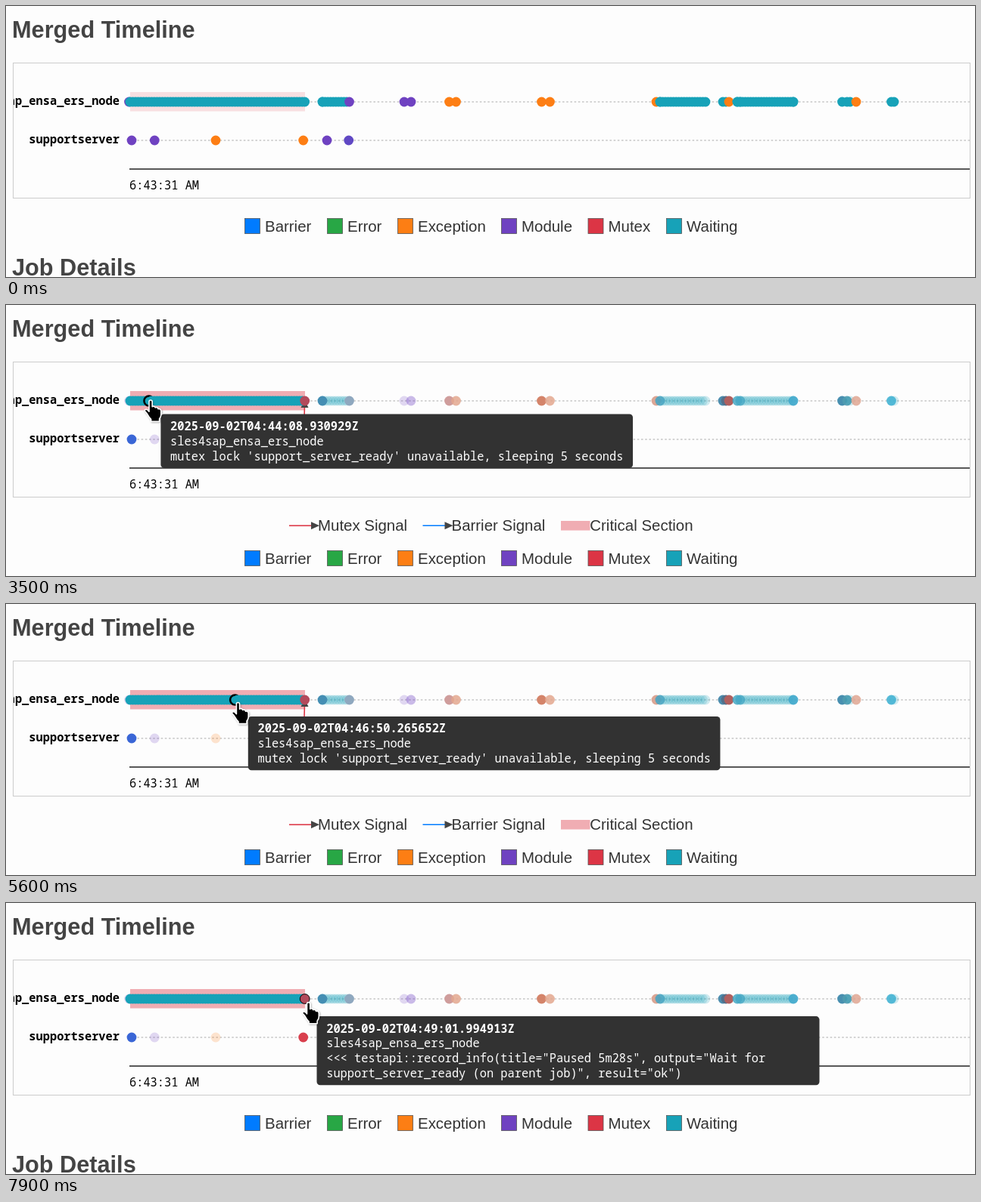
Recreate the animation shown at these times as an HTML page. Size 1280 px wide and 359 px high, loop 8000 ms.

```html
<!DOCTYPE html>
<html lang="en">
<head>
<meta charset="utf-8">
<title>Merged Timeline</title>
<style>
  html, body { margin: 0; width: 100%; height: 100%; overflow: hidden; background: #fdfdfd; }
  svg { display: block; width: 100%; height: 100%; }
  .head { font: bold 30.7px "Liberation Sans", Arial, sans-serif; fill: #444; }
  .key { font: 20.46px "Liberation Sans", Arial, sans-serif; fill: #333; }
  .mono { font: 15.35px "Noto Sans Mono", "DejaVu Sans Mono", monospace; }
  .bold { font-weight: bold; }
  .cursor { filter: drop-shadow(1px 1.5px 1px rgba(0, 0, 0, .3)); }
</style>
</head>
<body>
<svg id="stage" viewBox="0 0 1280 359"></svg>
<script>
const LOOP = 8000, STEP = 100;
const TEAL = '#17a2b8', PURPLE = '#6f42c1', ORANGE = '#fd7e14', RED = '#dc3545', BLUE = '#007bff';
const ROWS = [127, 178], R = 6.4, GAP = 3.553, LOCK_X = 188.8, FIRST = -7, LAST = 57, CHAR = 9.21;

const stage = document.getElementById('stage');

function add(parent, tag, attrs = {}, text) {
  const el = document.createElementNS('http://www.w3.org/2000/svg', tag);
  set(el, attrs);
  if (text !== undefined) el.textContent = text;
  parent.append(el);
  return el;
}
function set(el, attrs) {
  for (const name in attrs) el.setAttribute(name, attrs[name]);
}
const show = (el, on) => el.setAttribute('display', on ? 'inline' : 'none');
const mix = (a, b, p) => a + (b - a) * p;

// Page and chart frame
add(stage, 'text', { x: 8, y: 42, class: 'head' }, 'Merged Timeline');
const details = add(stage, 'text', { x: 8, y: 357, class: 'head' }, 'Job Details');
add(stage, 'rect', { x: 9.5, y: 75.5, width: 1264, height: 179, fill: 'none', stroke: '#ccc' });
const clip = add(add(stage, 'clipPath', { id: 'panel' }), 'rect', { x: 10, y: 76, width: 1263, height: 178 });
const chart = add(stage, 'g', { 'clip-path': 'url(#panel)' });
const section = add(chart, 'rect', { x: 164, y: 114, width: 231, height: 25.5, fill: RED });
['sles4sap_ensa_ers_node', 'supportserver'].forEach((name, i) => {
  const y = ROWS[i];
  add(chart, 'line', { x1: 163, x2: 1274, y1: y, y2: y, stroke: '#c8c8c8', 'stroke-width': 1.3, 'stroke-dasharray': '2.6 2.6' });
  add(chart, 'text', { x: 150, y: y + 3.7, class: 'mono bold', 'text-anchor': 'end' }, name);
});
add(chart, 'line', { x1: 163, x2: 1274, y1: 216, y2: 216, stroke: '#222', 'stroke-width': 1.6 });
add(chart, 'text', { x: 163, y: 242.5, class: 'mono' }, '6:43:31 AM');

const signal = add(chart, 'g');
add(signal, 'line', { x1: 393, y1: 178, x2: 394.5, y2: 134, stroke: RED, 'stroke-width': 1.6 });
add(signal, 'path', { d: 'M394.5 126L389.5 136H399.5Z', fill: '#444' });

// Event dots
const dots = [];
function dot(x, row, color, faded, alpha = 1) {
  const el = add(chart, 'circle', { cx: x, cy: ROWS[row], r: R, stroke: '#000', 'stroke-width': 0 });
  dots.push({ el, color, faded: faded || color, alpha });
  return el;
}
function waits(from, to) {
  const n = Math.round((to - from) / GAP);
  for (let i = 0; i <= n; i++) dot(mix(from, to, i / n), 0, TEAL, TEAL, .2);
}

const startDot = dot(162.5, 0, PURPLE, PURPLE, .2);
const locks = [];
for (let k = FIRST; k <= LAST; k++) locks.push(dot(LOCK_X + k * GAP, 0, TEAL));
const pauseDot = dot(394.7, 0, TEAL, '#b34a5c');
waits(418, 450);
dot(418, 0, TEAL, '#448eb3');
dot(453.5, 0, PURPLE, '#8fa8bf');
dot(526, 0, PURPLE, PURPLE, .2);
dot(535, 0, PURPLE, PURPLE, .36);
dot(585.5, 0, ORANGE, '#cf9d9c');
dot(594.5, 0, ORANGE, '#e3a78e', .85);
dot(707.5, 0, ORANGE, '#d4846a');
dot(718.5, 0, ORANGE, '#e3a78e', .85);
dot(859, 0, ORANGE, '#dba695');
waits(864, 924);
dot(864, 0, TEAL, '#4aa5c2', .85);
dot(947, 0, TEAL, '#4c8dae');
dot(951, 0, TEAL, '#54708a');
dot(955, 0, ORANGE, '#b0605f');
waits(966, 1040);
dot(966, 0, TEAL, '#46a8c4', .8);
dot(970, 0, TEAL, '#46a8c4', .8);
dot(1040, 0, TEAL, '#40a9cc', .9);
dot(1104.5, 0, TEAL, '#488fb0');
dot(1111, 0, TEAL, '#4f9bb0', .9);
dot(1115, 0, TEAL, TEAL, .2);
dot(1123, 0, ORANGE, '#dfa692', .85);
dot(1173, 0, TEAL, TEAL, .2);
dot(1169.5, 0, TEAL, '#42b3d3', .9);
dot(166, 1, PURPLE, '#3a66d6');
dot(196.3, 1, PURPLE, PURPLE, .2);
dot(277, 1, ORANGE, ORANGE, .2);
dot(392.7, 1, ORANGE, '#d93f4d');
dot(424, 1, PURPLE, PURPLE, .36);
dot(452.7, 1, '#6048c4', BLUE, .36);

// Legends
const kinds = add(stage, 'g');
[[315.5, 'Barrier', BLUE], [424.5, 'Error', '#28a745'], [517.5, 'Exception', ORANGE],
 [654.5, 'Module', PURPLE], [769, 'Mutex', RED], [872.5, 'Waiting', TEAL]].forEach(([x, name, fill]) => {
  add(kinds, 'rect', { x, y: 281.5, width: 20, height: 20, fill, stroke: '#555', 'stroke-width': .8 });
  add(kinds, 'text', { x: x + 26.5, y: 299, class: 'key' }, name);
});
const links = add(stage, 'g');
[[374, 'Mutex Signal', RED], [550.5, 'Barrier Signal', BLUE]].forEach(([x, name, stroke]) => {
  add(links, 'line', { x1: x, x2: x + 32, y1: 292.3, y2: 292.3, stroke, 'stroke-width': 1.6 });
  add(links, 'path', { d: `M${x + 29} 287.3L${x + 40} 292.3L${x + 29} 297.3Z`, fill: '#444' });
  add(links, 'text', { x: x + 38, y: 299, class: 'key' }, name);
});
add(links, 'rect', { x: 733, y: 286, width: 38.5, height: 12.6, fill: RED, opacity: .4 });
add(links, 'text', { x: 771.3, y: 299, class: 'key' }, 'Critical Section');

// Tooltip: lines of [text, bold] runs
const tip = add(stage, 'g', { fill: '#fff' });
let tipKey = '';
function stamp(k) {
  const s = k <= 18 ? 8.930929 + 90.584446 * k / 18 : 99.515375 + 151.607737 * (k - 18) / 30;
  const min = Math.floor(s / 60);
  return `2025-09-02T04:${44 + min}:${(s - min * 60).toFixed(6).padStart(9, '0')}Z`;
}
const event = (time, ...body) =>
  [[[time, true]], [['sles4sap_ensa_ers_node']], ...body.map(line => [[line]])];
const tips = {
  start: () => event('2025-09-02T04:43:31.214706Z', '||| starting boot_to_desktop tests/boot/boot_to_desktop.pm'),
  lock: k => event(stamp(k), "mutex lock 'support_server_ready' unavailable, sleeping 5 seconds"),
  crit: () => [[['Critical Section: '], ['support_server_ready', true]]],
  pause: () => event('2025-09-02T04:49:01.994913Z',
    '<<< testapi::record_info(title="Paused 5m28s", output="Wait for',
    'support_server_ready (on parent job)", result="ok")')
};
function fillTip(name, k) {
  const key = name + (name === 'lock' ? k : '');
  if (key === tipKey) return;
  tipKey = key;
  tip.replaceChildren();
  const lines = tips[name](k);
  const chars = Math.max(...lines.map(l => l.reduce((n, run) => n + run[0].length, 0)));
  const width = name === 'pause' ? 664 : chars * CHAR + 25;
  add(tip, 'rect', { width, height: 12 + 19.8 * lines.length, rx: 4.5, fill: '#323232' });
  lines.forEach((runs, i) => {
    let n = 0;
    for (const [text, bold] of runs) {
      add(tip, 'text', { x: 12.7 + n * CHAR, y: 21.5 + 19.8 * i, class: bold ? 'mono bold' : 'mono' }, text);
      n += text.length;
    }
  });
}

// Pointers
function pointer(d) {
  const g = add(stage, 'g', { class: 'cursor' });
  add(g, 'path', { d, fill: '#000', stroke: '#fff', 'stroke-width': 1.6, 'stroke-linejoin': 'round' });
  return g;
}
const pointers = {
  arrow: pointer('M.8 .8V25.3L6.2 20.2L10.4 29.8L14.2 28.2L10.1 18.8H17.4Z'),
  hand: pointer('M7 3Q7 .8 9 .8Q11.2 .8 11.2 3V9.6Q12 8.6 13.5 9Q15 9.4 15.2 10.8Q16.2 10 17.6 10.6Q18.9 11.2 19.1 12.6Q20.4 12 21.6 12.8Q22.8 13.6 22.8 15V20Q22.8 23 20.6 25.5V29H9.6V26.2Q7 24 5.6 21Q4 18 1.8 16Q.6 14.6 1.7 13.5Q3.4 12.5 5.2 14L7 16Z'),
  beam: pointer('M-8 -13.5H-3Q-1 -13.5 0 -12Q1 -13.5 3 -13.5H8V-10.5H4Q1.5 -10.5 1.5 -8V8Q1.5 10.5 4 10.5H8V13.5H3Q1 13.5 0 12Q-1 13.5 -3 13.5H-8V10.5H-4Q-1.5 10.5 -1.5 8V-8Q-1.5 -10.5 -4 -10.5H-8Z')
};
const tipOffset = { arrow: [11, 17], hand: [22.4, 19.3] };

// ms, pointer, x, y, tooltip, tooltip lag
const poses = [
  [0, '', 0, 0, ''],
  [200, 'beam', 148.5, 124.5, ''],
  [1100, 'arrow', 148.5, 123.5, ''],
  [1300, 'arrow', 149, 124, ''],
  [1500, 'beam', 151.5, 124.5, ''],
  [1700, 'beam', 153, 124.5, ''],
  [1800, 'arrow', 154.5, 124.2, ''],
  [1900, 'arrow', 156, 124.4, ''],
  [2100, 'arrow', 157.3, 124.4, ''],
  [2400, 'hand', 151.5, 124, 'start'],
  [2500, 'hand', 155.5, 124, 'start'],
  [2700, 'hand', 158, 124.5, 'lock'],
  [3500, 'hand', 182, 125.2, 'lock'],
  [4400, 'hand', 205.6, 128, 'lock'],
  [4800, 'hand', 234, 128.2, 'lock', -4],
  [5000, 'hand', 267, 128.5, 'lock', -20.8],
  [5100, 'hand', 273, 128.5, 'lock', -6],
  [5300, 'hand', 280.6, 128.5, 'lock'],
  [5700, 'hand', 303, 130, 'lock'],
  [5800, 'arrow', 327, 135, 'crit'],
  [6100, 'arrow', 334, 136, 'crit'],
  [6300, 'arrow', 341, 136, 'crit'],
  [6400, 'hand', 341, 132, 'lock'],
  [6800, 'hand', 353.6, 130.8, 'lock'],
  [6900, 'hand', 356, 130.8, 'lock'],
  [7000, 'hand', 356, 130.8, 'lock'],
  [7800, 'hand', 386, 130.8, 'lock'],
  [7900, 'hand', 390.5, 130.8, 'pause', -2.4]
];

function poseAt(t) {
  const i = poses.findLastIndex(p => p[0] <= t);
  const a = poses[i], b = poses[i + 1];
  const p = b && a[4] && a[4] === b[4] ? (t - a[0]) / (b[0] - a[0]) : 0;
  const at = n => mix(a[n] || 0, p ? b[n] || 0 : 0, p);
  return { kind: a[1], x: at(2), y: at(3), tip: a[4], lag: at(5) };
}
const ramp = (t, from, span) => Math.min(1, Math.max(0, (t - from) / span));

function draw(t) {
  const pose = poseAt(t);
  const dim = ramp(t, 2600, 300) - ramp(t, 5700, 400) + ramp(t, 6300, 300);
  const linked = pose.tip === 'lock';

  for (const { el, color, faded, alpha } of dots) set(el, {
    fill: dim === 0 ? color : dim === 1 ? faded : `color-mix(in srgb, ${faded} ${dim * 100}%, ${color})`,
    opacity: mix(1, alpha, dim),
    'stroke-width': 0
  });
  section.setAttribute('opacity', mix(.15, .4, dim));
  show(signal, linked);
  show(links, linked);
  show(details, !linked);
  set(kinds, { transform: `translate(0 ${linked ? 44 : 0})` });

  show(tip, pose.tip);
  if (pose.tip) {
    const [dx, dy] = tipOffset[pose.kind];
    const tx = pose.x + dx + pose.lag, ty = pose.y + dy;
    const k = Math.min(LAST, Math.max(FIRST, Math.round((tx - 16 - LOCK_X) / GAP)));
    fillTip(pose.tip, k);
    set(tip, { transform: `translate(${tx} ${ty})` });
    const hot = { start: startDot, lock: locks[k - FIRST], pause: pauseDot }[pose.tip];
    if (hot) set(hot, { 'stroke-width': pose.tip === 'pause' ? 1 : 2.5 });
  }
  for (const name in pointers) {
    show(pointers[name], name === pose.kind);
    if (name === pose.kind) set(pointers[name], { transform: `translate(${pose.x} ${pose.y})` });
  }
}

const begin = performance.now();
function tick() {
  const t = (performance.now() - begin) % LOOP;
  draw(Math.floor(t / STEP) * STEP);
  requestAnimationFrame(tick);
}
tick();
</script>
</body>
</html>
```
